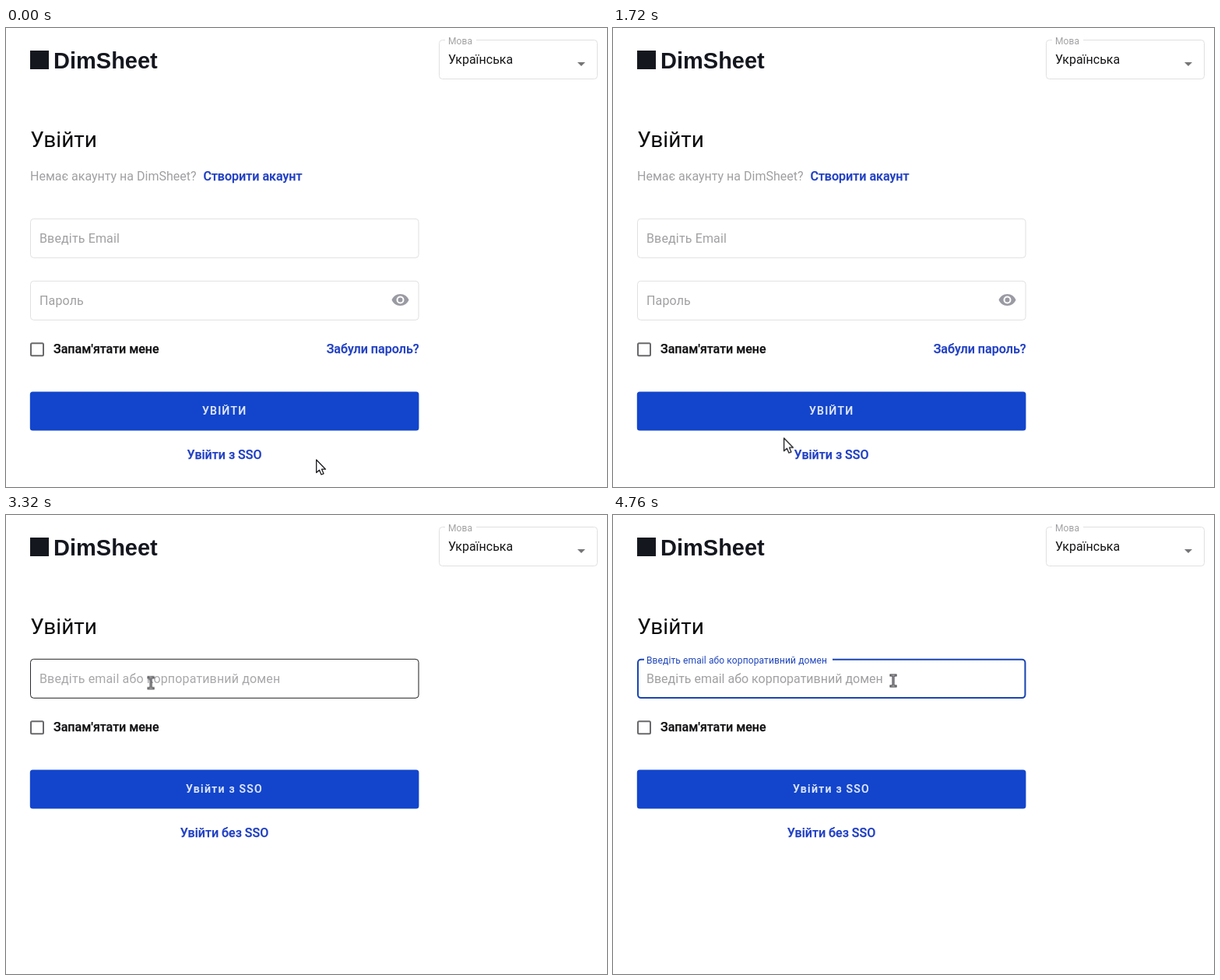
Recreate the animation shown at these times as an HTML page. Size 772 by 590 pixels, loop 5000 ms.

```html
<!DOCTYPE html>
<html lang="uk">
<head>
<meta charset="utf-8">
<title>Увійти</title>
<style>
html, body { margin: 0; width: 100%; height: 100%; overflow: hidden; background: #fff; }
svg { display: block; width: 772px; height: 590px; }
text { font: 400 16px Roboto, sans-serif; white-space: pre; }
.brand { font: 700 29px "Liberation Sans", Arial, sans-serif; fill: #15171f; }
.title { font-size: 28px; fill: #0c0c0e; }
.grey { fill: #a0a0a3; }
.label { letter-spacing: .15px; }
.bold, .link { font-weight: 500; stroke-width: .25px; }
.bold { fill: #101013; stroke: #101013; }
.link { fill: #1f3ec2; stroke: #1f3ec2; }
.small { font-size: 12px; letter-spacing: .11px; }
.btn { font-size: 14px; font-weight: 500; letter-spacing: 1.25px; fill: #e2e8f9; stroke: #e2e8f9; stroke-width: .2px; }
.box { fill: none; stroke: #e0e0e2; }
.blue { fill: #1245cc; }

.step { animation: 5s step-end infinite; }
#login { animation-name: login; }
#sso { animation-name: sso; }
#hover { animation-name: hover; }
#focus { animation-name: focus; }
#caret { animation-name: caret; }
#arrow { animation-name: arrow; }
#hand { animation-name: hand; }
#beam { animation-name: beam; }
#shadow { animation: shadow 5s linear infinite; filter: drop-shadow(0 2px 2px rgba(0, 0, 0, .45)); }
#hint { animation: hint 5s linear infinite; }
#float { animation: float 5s linear infinite; }
#cursor { animation: move 5s linear infinite; }

@keyframes login { 0% { opacity: 1 } 44.8%, 100% { opacity: 0 } }
@keyframes sso { 0% { opacity: 0 } 44.8%, 100% { opacity: 1 } }
@keyframes hover { 0% { opacity: 0 } 63.4% { opacity: 1 } 71.7%, 100% { opacity: 0 } }
@keyframes focus { 0% { opacity: 0 } 71.7%, 100% { opacity: 1 } }
@keyframes caret { 0% { opacity: 0 } 71.7% { opacity: 1 } 83.7%, 100% { opacity: 0 } }
@keyframes arrow {
  0% { opacity: 1 } 42% { opacity: 0 } 44.8% { opacity: 1 }
  59.2% { opacity: 0 } 60.4% { opacity: 1 } 63.4%, 100% { opacity: 0 }
}
@keyframes hand {
  0% { opacity: 0 } 42% { opacity: 1 } 44.8% { opacity: 0 }
  59.2% { opacity: 1 } 60.4%, 100% { opacity: 0 }
}
@keyframes beam { 0% { opacity: 0 } 63.4%, 100% { opacity: 1 } }
@keyframes shadow { 0%, 59.2% { opacity: 0 } 60.2% { opacity: 1 } 64%, 100% { opacity: 0 } }
@keyframes hint { 0%, 71.7% { opacity: 0 } 73%, 100% { opacity: 1 } }
@keyframes float {
  0% { transform: translate(43px, 215.5px); fill: #a8a8ab }
  71.7% { transform: translate(43px, 215.5px); fill: #a8a8ab; animation-timing-function: cubic-bezier(0, 0, .2, 1) }
  75.7%, 100% { transform: translate(43px, 190.5px) scale(.75); fill: #1f45bd }
}
@keyframes move {
  0%, 12% { transform: translate(398px, 554px) }
  15% { transform: translate(401px, 559px) }
  18% { transform: translate(391px, 569px) }
  21.6% { transform: translate(345px, 573px) }
  22.8% { transform: translate(319px, 571px) }
  25% { transform: translate(296px, 571px) }
  28% { transform: translate(262px, 567px) }
  30.4% { transform: translate(242px, 549px) }
  32.4% { transform: translate(235px, 523px) }
  33.4% { transform: translate(224px, 519px) }
  34.4% { transform: translate(219px, 526px) }
  36% { transform: translate(212px, 539px) }
  38.4% { transform: translate(232px, 562px) }
  41.2% { transform: translate(270px, 563px) }
  43.2%, 55.2% { transform: translate(281px, 547px) }
  57.2% { transform: translate(278px, 480px) }
  58.8% { transform: translate(266px, 390px) }
  60% { transform: translate(256px, 339px) }
  61.6% { transform: translate(232px, 285px) }
  63.2% { transform: translate(206px, 240px) }
  65.2% { transform: translate(188px, 218px) }
  66.8% { transform: translate(185.5px, 215px) }
  82.4% { transform: translate(185.5px, 215px); animation-timing-function: ease-in-out }
  94%, 100% { transform: translate(360px, 213px) }
}
</style>
</head>
<body>
<svg viewBox="0 0 772 590">
  <defs>
    <rect id="button" class="blue" x="30.8" y="467.4" width="499.6" height="50" rx="3.5"/>
    <g id="controls">
      <rect x="32" y="405.3" width="16" height="16" rx="1.5" fill="none" stroke="#69696c" stroke-width="2"/>
      <text class="bold" x="61" y="418">Запам'ятати мене</text>
      <use href="#button"/>
    </g>
    <rect id="field" x="31.5" y="185.3" width="498.5" height="50" rx="4"/>
    <path id="ibeam" d="M-3-7H3M-3 7H3M0-7V7" fill="none" stroke-linecap="square"/>
  </defs>

  <rect width="772" height="590" fill="#fff"/>
  <rect x="31" y="29" width="24" height="24" fill="#15171f"/>
  <text class="brand" x="61" y="52">DimSheet</text>
  <rect class="box" x="556.5" y="15.5" width="203" height="50" rx="4"/>
  <rect x="564" y="14" width="40" height="4" fill="#fff"/>
  <text class="grey small" x="568" y="21">Мова</text>
  <text x="568" y="46" fill="#151517">Українська</text>
  <path d="M734 44H744L739 49Z" fill="#757578"/>
  <text class="title" x="31.2" y="153">Увійти</text>

  <g id="login" class="step">
    <text class="grey" x="31" y="195.5">Немає акаунту на DimSheet?</text>
    <text class="link" x="253.5" y="195.5">Створити акаунт</text>
    <use href="#field" class="box" y="60"/>
    <text class="grey label" x="43" y="275.5">Введіть Email</text>
    <use href="#field" class="box" y="140"/>
    <text class="grey label" x="43" y="355.5">Пароль</text>
    <path transform="translate(494.5 337.5)" fill="#9a9aa3" d="M12 4.5C7 4.5 2.7 7.6 1 12c1.7 4.4 6 7.5 11 7.5s9.3-3.1 11-7.5c-1.7-4.4-6-7.5-11-7.5zM12 17a5 5 0 1 1 0-10 5 5 0 0 1 0 10zm0-8a3 3 0 1 0 0 6 3 3 0 0 0 0-6z"/>
    <text class="link" x="530.5" y="418" text-anchor="end">Забули пароль?</text>
    <use href="#controls"/>
    <text class="btn" x="252" y="497">УВІЙТИ</text>
    <text class="link" x="280.5" y="554" text-anchor="middle">Увійти з SSO</text>
  </g>

  <g id="sso" class="step">
    <use href="#field" class="box"/>
    <use href="#field" id="hover" class="step" fill="none" stroke="#2a2a2d"/>
    <g id="focus" class="step">
      <rect x="32" y="185.7" width="497.4" height="49.4" rx="4" fill="#fff" stroke="#1a45b4" stroke-width="2"/>
      <rect x="40" y="184" width="242" height="4" fill="#fff"/>
    </g>
    <text id="hint" class="grey" x="43" y="215.5">Введіть email або корпоративний домен</text>
    <text id="float" class="label">Введіть email або корпоративний домен</text>
    <rect id="caret" class="step" x="43" y="202" width="1" height="18" fill="#222"/>
    <use href="#button" id="shadow" y="-140"/>
    <use href="#controls" y="-140"/>
    <text class="btn" x="231" y="357">Увійти з SSO</text>
    <text class="link" x="280.5" y="414" text-anchor="middle">Увійти без SSO</text>
  </g>

  <g id="cursor">
    <path id="arrow" class="step" d="M.7 1V17.6L4.5 14.2L7 20L10 18.8L7.6 13.2H12.5Z" fill="#fff" stroke="#1c1c20" stroke-width="1.3" stroke-linejoin="round"/>
    <g id="hand" class="step">
      <path d="M-1.6 9V1.5Q-1.6 0 0 0T1.6 1.5V6Q3.6 4.8 4.4 6.6Q6.4 5.6 7 7.4Q9.4 6.8 9.4 9V12.5Q9 15 8 17H0Q-1 14.5-3.4 12.5L-5.4 10Q-5.4 7.8-3.4 8.2Z" fill="#fff" stroke="#1c1c20" stroke-width="1.2" stroke-linejoin="round"/>
      <path d="M1.6 6V9M4.4 7V9.5M7 8V10" fill="none" stroke="#1c1c20"/>
    </g>
    <g id="beam" class="step">
      <use href="#ibeam" stroke="#333336" stroke-width="3"/>
      <use href="#ibeam" stroke="#c4c4c8"/>
    </g>
  </g>
</svg>
</body>
</html>
```
